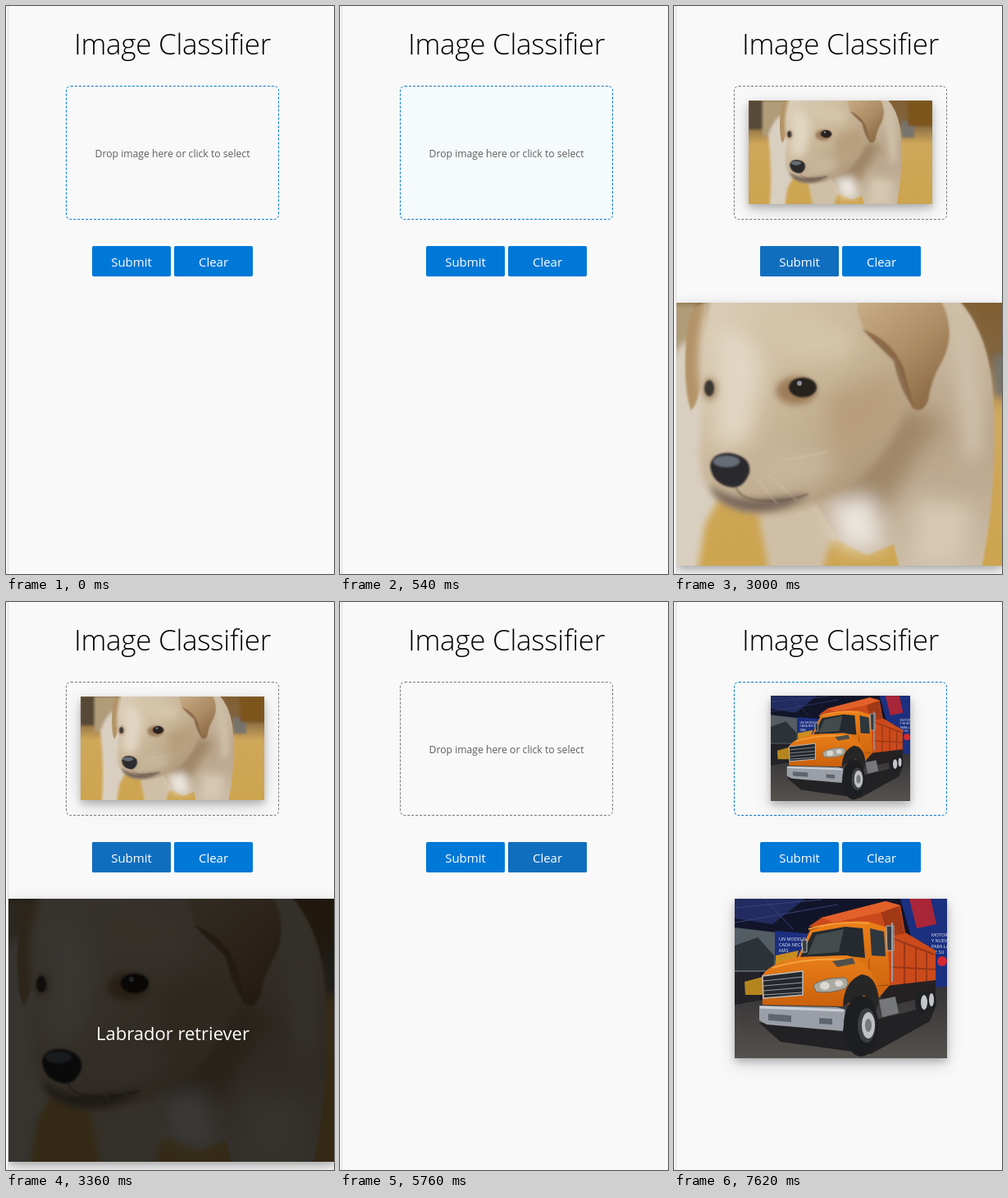
An HTML page that plays this animation: 400x691 px, repeating every 8000 ms.

```html
<!DOCTYPE html>
<html lang="en">
<head>
<meta charset="utf-8">
<title>Image Classifier</title>
<style>
  html, body { margin: 0; height: 100%; overflow: hidden; background: #f9f9f9; }
  svg { display: block; width: 100vw; height: 100vh; font-family: "Open Sans", "Noto Sans", sans-serif; }
  .label text { text-anchor: middle; }
  .zone {
    position: absolute; left: 73px; top: 97px; width: 260px; height: 163px;
    box-sizing: border-box; border: 1px dashed; border-radius: 6px;
  }
  .shadow { filter: drop-shadow(0 4px 4px rgba(0, 0, 0, .2)) drop-shadow(0 6px 10px rgba(0, 0, 0, .17)); }
</style>
</head>
<body>
<svg viewBox="0 0 400 691">
  <defs>
    <filter id="blur1" x="-30%" y="-30%" width="160%" height="160%"><feGaussianBlur stdDeviation="1.2"/></filter>
    <filter id="blur4" x="-30%" y="-30%" width="160%" height="160%"><feGaussianBlur stdDeviation="4"/></filter>
    <filter id="blur12" x="-60%" y="-60%" width="220%" height="220%"><feGaussianBlur stdDeviation="12"/></filter>
    <linearGradient id="fur" x2=".9" y2="1">
      <stop stop-color="#dccfb9"/><stop offset=".5" stop-color="#c9b699"/><stop offset="1" stop-color="#a88f72"/>
    </linearGradient>
    <linearGradient id="coat" x2="0" y2="1">
      <stop stop-color="#cfc0a8"/><stop offset=".5" stop-color="#b7a187"/><stop offset="1" stop-color="#cbbca7"/>
    </linearGradient>
    <linearGradient id="ear" x2=".7" y2="1">
      <stop stop-color="#c9ae87"/><stop offset=".6" stop-color="#aa8a62"/><stop offset="1" stop-color="#8b6a45"/>
    </linearGradient>
    <linearGradient id="room" x2="0" y2="1">
      <stop stop-color="#805f32"/><stop offset=".22" stop-color="#806440"/>
      <stop offset=".42" stop-color="#cfa75a"/><stop offset="1" stop-color="#cda44f"/>
    </linearGradient>
    <linearGradient id="floor" x2="0" y2="1">
      <stop stop-color="#343335"/><stop offset="1" stop-color="#55514d"/>
    </linearGradient>
    <linearGradient id="paint" x2="0" y2="1">
      <stop stop-color="#ea8019"/><stop offset="1" stop-color="#ca610c"/>
    </linearGradient>

    <symbol id="dog" viewBox="-83 361 569 320">
      <path d="M-83 361H486V681H-83Z" fill="url(#room)"/>
      <g filter="url(#blur4)">
        <path d="M-83 361H-35V450H-83Z" fill="#564a35"/>
        <path d="M-40 361H30V470H-40Z" fill="#b09c79"/>
        <path d="M390 425H430V475H390Z" fill="#77736d"/>
        <path d="M410 361H490V440H410Z" fill="#7d541d"/>
        <path d="M-22 470Q0 400 40 400L60 590 38 630 28 690H-18Q-8 590 -22 470Z" fill="#d9cfc0"/>
        <path d="M102 615L220 560 250 620 190 655 180 690H116Z" fill="#cfbfa6"/>
      </g>
      <g filter="url(#blur1)">
        <path d="M210 355H345Q378 390 387 450C396 540 388 620 375 685H275L268 655 235 668 200 650 170 600Z" fill="url(#coat)"/>
      </g>
      <g filter="url(#blur12)">
        <path d="M190 600L275 490 325 500 260 610Z" fill="#a08769"/>
        <path d="M190 605L240 595 255 660H205Z" fill="#eae5de"/>
        <path d="M340 370Q375 420 378 540L355 560Z" fill="#d3c5b0"/>
        <path d="M295 600L365 610 350 680H290Z" fill="#d6c8b1"/>
      </g>
      <g filter="url(#blur1)">
        <path d="M40 361Q18 362 15 400C12 440 14 478 21 492Q33 480 36 430Z" fill="#b39468"/>
      </g>
      <g filter="url(#blur4)">
        <path d="M42 350H238L262 390 284 480C265 545 230 580 180 601Q130 625 85 614 50 604 37 578C25 548 36 515 34 475 24 430 32 390 42 350Z" fill="url(#fur)"/>
      </g>
      <g filter="url(#blur12)">
        <path d="M50 390Q90 380 110 440L90 530 50 535Z" fill="#e1d6c2"/>
        <path d="M110 380Q170 370 220 400L210 430 130 425Z" fill="#d6c6a9"/>
        <path d="M95 550Q130 525 195 550L175 580 110 590Z" fill="#c8b69c"/>
        <path d="M185 475L265 450 270 500 200 550Z" fill="#b89e7b"/>
      </g>
      <g filter="url(#blur4)">
        <ellipse cx="149" cy="468" rx="25" ry="17" fill="#9c7b59"/>
        <ellipse cx="44" cy="466" rx="9" ry="14" fill="#ab9070"/>
        <path d="M43 582Q70 602 105 600L165 594Q130 620 85 614 50 606 43 582Z" fill="#77665a"/>
      </g>
      <g filter="url(#blur1)">
        <path d="M225 357H325Q345 395 328 430 313 455 310 480 302 498 290 488 281 455 270 430 250 415 236 400 220 375 225 357Z" fill="url(#ear)"/>
        <path d="M229 393Q265 405 280 440L292 488Q276 470 268 432Z" fill="#79583a" opacity=".7"/>
        <ellipse cx="157" cy="464" rx="17" ry="12" fill="#28211f"/>
        <ellipse cx="43" cy="465" rx="6" ry="10" fill="#3e3835"/>
        <path d="M44 559Q47 542 70 544 95 549 92 568 84 589 67 585 46 580 44 559Z" fill="#2b2a2d"/>
        <ellipse cx="64" cy="554" rx="16" ry="7" fill="#666c76"/>
        <path d="M75 584Q80 601 110 602T163 594" fill="none" stroke="#5d4b3f" stroke-width="2" opacity=".6"/>
        <path d="M136 552L188 542M115 570L150 602M100 574L126 606" stroke="#eee1cb" opacity=".5"/>
      </g>
      <circle cx="153" cy="459" r="3" fill="#8d949e"/>
    </symbol>

    <symbol id="truck" viewBox="74 361 259 194">
      <path d="M74 361H333V555H74Z" fill="#121529"/>
      <path d="M74 361H160L120 392 74 385Z" fill="#222c60"/>
      <path d="M74 372L180 362M74 390L200 368M110 361L145 398" stroke="#364379"/>
      <path d="M74 396L124 402V450H74Z" fill="#545d63"/>
      <path d="M74 418L102 408 122 430V448H74Z" fill="#2b3238"/>
      <path d="M123 400L172 404V436H123ZM276 361H333V480H310Z" fill="#1c3080"/>
      <path d="M287 361H313L320 392 296 397Z" fill="#a92538"/>
      <path d="M74 450H105V492H74Z" fill="#222227"/>
      <path d="M74 490L160 475 333 468V555H74Z" fill="url(#floor)"/>
      <path d="M86 462L108 456V478H87Z" fill="#b5851d"/>
      <path d="M124 430L152 424 148 438 124 441Z" fill="#c98d20"/>
      <path d="M104 512L207 518 320 490 312 510 240 550 130 535Z" fill="#222123"/>
      <g fill="#e9ecf4" font-size="5.500">
        <text x="128" y="412">UN MODELO</text><text x="128" y="419">CADA NECES</text><text x="128" y="426">MÁS</text>
        <text x="314" y="407">MOTOR</text><text x="314" y="414">Y NUEVO</text><text x="314" y="421">PARA LA</text><text x="314" y="428">DE SU</text>
      </g>
      <circle cx="327" cy="437" r="6" fill="#d32934"/>
      <path d="M164 395L180 384 258 364 276 369 282 402 319 424V464L262 474 240 400Z" fill="#cb4a1b"/>
      <path d="M180 384L258 364 276 369 251 378 195 390Z" fill="#e2602a"/>
      <path d="M252 378L275 370 281 403 262 407Z" fill="#a23916"/>
      <path d="M266 409L318 429M264 444L319 447M281 413V466M295 419V465M308 425V463" stroke="#9a3716" stroke-width="2"/>
      <path d="M250 468L319 460V478L255 493Z" fill="#252123"/>
      <path d="M150 434L166 399Q200 386 238 389L260 396 263 466 246 486 206 490Z" fill="url(#paint)"/>
      <path d="M154 432L169 402 209 395 230 397 233 433 206 430Z" fill="#242a30"/>
      <path d="M239 397L256 401 258 431 241 430Z" fill="#2d3740"/>
      <path d="M173 405L207 398 201 426 163 429Z" fill="#434b4b"/>
      <path d="M164 398Q200 387 238 391" fill="none" stroke="#f59c37" stroke-width="2"/>
      <path d="M238 434V468L261 466" fill="none" stroke="#984a0e"/>
      <path d="M107 455Q116 440 151 432L212 430Q237 438 248 464L247 484H207V492L108 490Z" fill="url(#paint)"/>
      <path d="M120 445Q160 432 210 435" fill="none" stroke="#f5a342" stroke-width="2"/>
      <path d="M193 437L218 433 221 440 199 444Z" fill="#51504c"/>
      <path d="M206 492Q207 461 229 453 248 455 250 486L245 500 232 478Z" fill="#272626"/>
      <path d="M108 455L157 449V478L109 482Z" fill="#24272b" stroke="#b9bdbf" stroke-width="1.5"/>
      <path d="M109 461L157 456M109 467L157 463M109 473L157 469M109 478L157 475" stroke="#969ca1" stroke-width="1.2"/>
      <path d="M170 466Q181 457 208 457 216 462 209 470 190 477 173 474Z" fill="#aaa9a0" stroke="#6b6762"/>
      <ellipse cx="184" cy="467" rx="6" ry="5" fill="#dad8d0"/>
      <ellipse cx="201" cy="464" rx="5" ry="4" fill="#dad8d0"/>
      <path d="M104 491L199 493 209 496 206 522 113 514 104 509Z" fill="#9a9ea7"/>
      <path d="M105 493L207 497" stroke="#ccd0d7" stroke-width="3"/>
      <path d="M115 501L143 503V511L115 509ZM177 506L193 507V514L177 513Z" fill="#60656d"/>
      <path d="M250 484L270 480 274 500 254 505Z" fill="#76777b"/>
      <ellipse cx="228" cy="516" rx="21" ry="37" fill="#1d1e21"/>
      <ellipse cx="235" cy="515" rx="11" ry="21" fill="#3c3e41"/>
      <ellipse cx="237" cy="515" rx="8" ry="16" fill="#c0c1c4"/>
      <ellipse cx="237" cy="515" rx="4" ry="8" fill="#77797d"/>
      <g fill="#1f2023"><ellipse cx="303" cy="487" rx="9" ry="15"/><ellipse cx="313" cy="484" rx="7" ry="13"/></g>
      <g fill="#c4c5c7"><ellipse cx="305" cy="487" rx="4" ry="9"/><ellipse cx="314" cy="484" rx="3" ry="8"/></g>
      <path d="M259 394H268V424H260ZM156 411H162V426H157Z" fill="#363a40" stroke="#b3b8bc"/>
      <path d="M266 390V462" stroke="#9a9ea3" stroke-width="2"/>
    </symbol>
  </defs>

  <rect width="400" height="691" fill="#f9f9f9"/>
  <text x="203" y="59" text-anchor="middle" font-size="35" font-weight="300" letter-spacing="-.3">Image Classifier</text>

  <rect id="zoneFill" x="73" y="97" width="260" height="163" rx="6" fill="#f5fafc"/>
  <g class="label" font-size="12.2">
    <text id="hint" x="203" y="184" fill="#605e5c">Drop image here or click to select</text>
    <text id="hintWhite" x="203" y="184" fill="#fff" stroke="#fff" stroke-width=".5">Drop image here or click to select</text>
  </g>

  <g class="label" font-size="15" font-weight="500" fill="#fff">
    <rect x="105" y="292" width="96" height="37" rx="2" fill="#0078d7"/>
    <rect id="submitHover" x="105" y="292" width="96" height="37" rx="2" fill="#106ebe"/>
    <text x="153" y="317">Submit</text>
    <rect x="205" y="292" width="96" height="37" rx="2" fill="#0078d7"/>
    <rect id="clearHover" x="205" y="292" width="96" height="37" rx="2" fill="#106ebe"/>
    <text x="253" y="317">Clear</text>
  </g>

  <g id="dogThumb">
    <rect class="shadow" x="91" y="115" width="224" height="126" fill="#bba"/>
    <use href="#dog" x="91" y="115" width="224" height="126"/>
  </g>
  <g id="dogLarge">
    <rect class="shadow" x="3" y="361" width="397" height="320" fill="#bba"/>
    <use href="#dog" x="-83" y="361" width="569" height="320"/>
  </g>
  <rect id="shade" x="3" y="361" width="397" height="320"/>
  <g id="result" class="label"><text x="203.500" y="533" font-size="22" font-weight="500" fill="#fff">Labrador retriever</text></g>
  <g id="truckBoth">
    <rect class="shadow" x="118" y="114" width="170" height="128" fill="#333"/>
    <use href="#truck" x="118" y="114" width="170" height="128"/>
    <rect class="shadow" x="74" y="361" width="259" height="194" fill="#333"/>
    <use href="#truck" x="74" y="361" width="259" height="194"/>
  </g>
  <rect id="scrollbar" x="396" y="2" width="3" height="674" rx="1" fill="#888"/>
  <rect width="3" height="691" fill="#fafafa"/>
  <path d="M2.500 0V691" stroke="#dcdcdc"/>
</svg>
<div id="zoneBlue" class="zone" style="border-color: #0078d4"></div>
<div id="zoneGray" class="zone" style="border-color: #777"></div>
<script>
const LOOP = 8000, TICK = 60;
const show = (id, opacity) => {
  const style = document.getElementById(id).style;
  style.opacity = +opacity;
  style.display = +opacity ? '' : 'none';
};

function draw(now) {
  const t = now % LOOP;
  const within = (from, to) => t >= from && t < to;
  // Fades advance in whole ticks, starting with a visible first step.
  const ramp = (from, to) => t < from ? 0 :
    Math.min(1, (Math.floor((t - from) / TICK) + 1) / ((to - from) / TICK + 1));
  const leaving = 1 - ramp(6180, 6360);
  const gray = t < 3000 ? 0 : leaving;

  show('zoneFill', within(420, 2100) ? (t < 540 ? .5 : 1) : 0);
  show('zoneBlue', 1 - gray);
  show('zoneGray', gray);
  show('hint', within(0, 2100) || within(5580, 7620));
  show('hintWhite', within(2100, 2160));
  show('submitHover', within(3000, 5400));
  show('clearHover', t < 5400 ? 0 : leaving);
  show('dogThumb', within(2160, 5580));
  show('dogLarge', within(2100, 5580));
  show('shade', t < 5580 ? .75 * ramp(3240, 3360) : 0);
  show('result', t < 5580 ? ramp(3240, 3360) : 0);
  show('truckBoth', t >= 7620);
  show('scrollbar', t < 2100 ? 0 : .65 * (1 - ramp(2400, 2640)));
  requestAnimationFrame(draw);
}
draw(performance.now());
</script>
</body>
</html>
```
